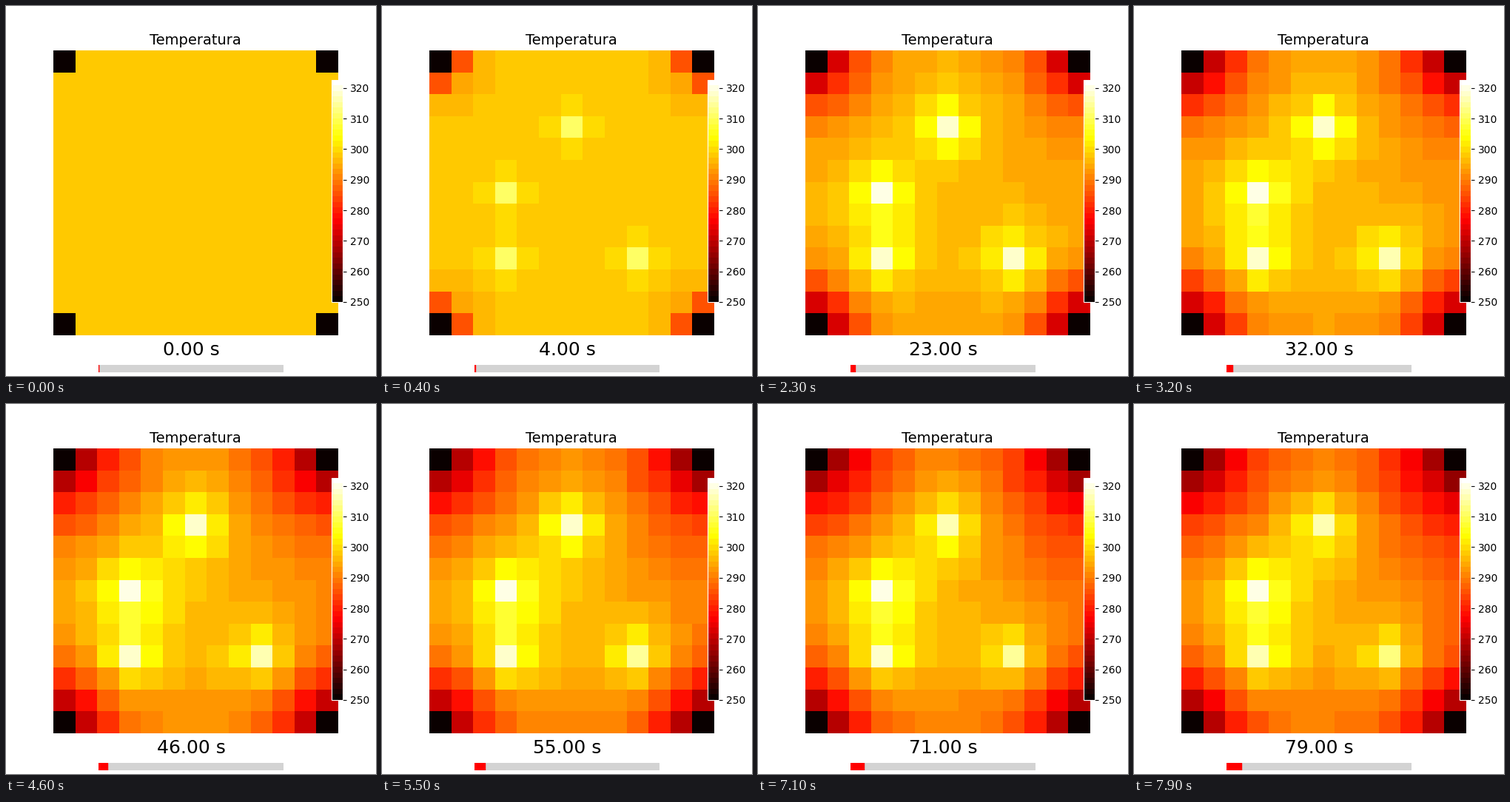
A matplotlib script for the animation above (8000 ms loop, 500 px wide and 500 px high).

```python
import numpy as np
import matplotlib.pyplot as plt
from matplotlib.animation import FuncAnimation
from matplotlib.patches import Rectangle

N = 13                # cells per side
FRAMES = 80           # one simulated second per frame
SUBSTEPS = 10
T_START, T_COLD, T_AMBIENT = 298.15, 250.0, 273.15
DIFFUSION = 0.095     # cells^2 / s
COOLING = 0.007       # 1 / s
HEATING = 6.1         # K / s
T_MIN, T_MAX = 250.0, 322.6
DURATION = 1000       # full length of the progress bar, s
HEATERS = [(3, 6), (6, 3), (9, 3), (9, 9)]


def chill_corners(temp):
    temp[::N - 1, ::N - 1] = T_COLD


def laplacian(temp):
    p = np.pad(temp, 1, mode="edge")
    return p[:-2, 1:-1] + p[2:, 1:-1] + p[1:-1, :-2] + p[1:-1, 2:] - 4 * temp


def simulate():
    power = np.zeros((N, N))
    for cell in HEATERS:
        power[cell] = HEATING
    temp = np.full((N, N), T_START)
    chill_corners(temp)
    history = [temp.copy()]
    dt = 1 / SUBSTEPS
    for _ in range(FRAMES - 1):
        for _ in range(SUBSTEPS):
            loss = COOLING * (temp - T_AMBIENT)
            temp += dt * (DIFFUSION * laplacian(temp) + power - loss)
            chill_corners(temp)
        history.append(temp.copy())
    return history


history = simulate()

fig, ax = plt.subplots(figsize=(5, 5), dpi=100)
ax.set_title("Temperatura", fontsize=14)
ax.axis("off")
image = ax.imshow(history[0], cmap=plt.get_cmap("hot", 40),
                  vmin=T_MIN, vmax=T_MAX, interpolation="nearest")

cax = fig.add_axes([0.88, 0.2, 0.03, 0.6])
cbar = fig.colorbar(image, cax=cax, ticks=range(250, 321, 10))
cbar.outline.set_edgecolor("white")

bar_ax = fig.add_axes([0.25, 0.01, 0.5, 0.02], facecolor="lightgrey")
bar_ax.set(xlim=(0, DURATION), ylim=(0, 1), xticks=[], yticks=[])
bar_ax.spines[:].set_visible(False)
bar_ax.axvline(0, color="red", lw=1)
bar = bar_ax.add_patch(Rectangle((0, 0), 0, 1, fc="red", ec="red", lw=1))

clock = fig.text(0.5, 0.055, "", fontsize=18, ha="center", va="baseline")


def update(second):
    image.set_data(history[second])
    bar.set_width(second)
    clock.set_text(f"{second:.2f} s")
    return image, bar, clock


anim = FuncAnimation(fig, update, frames=FRAMES, interval=100,
                     repeat=True, repeat_delay=0)
plt.show()
```
